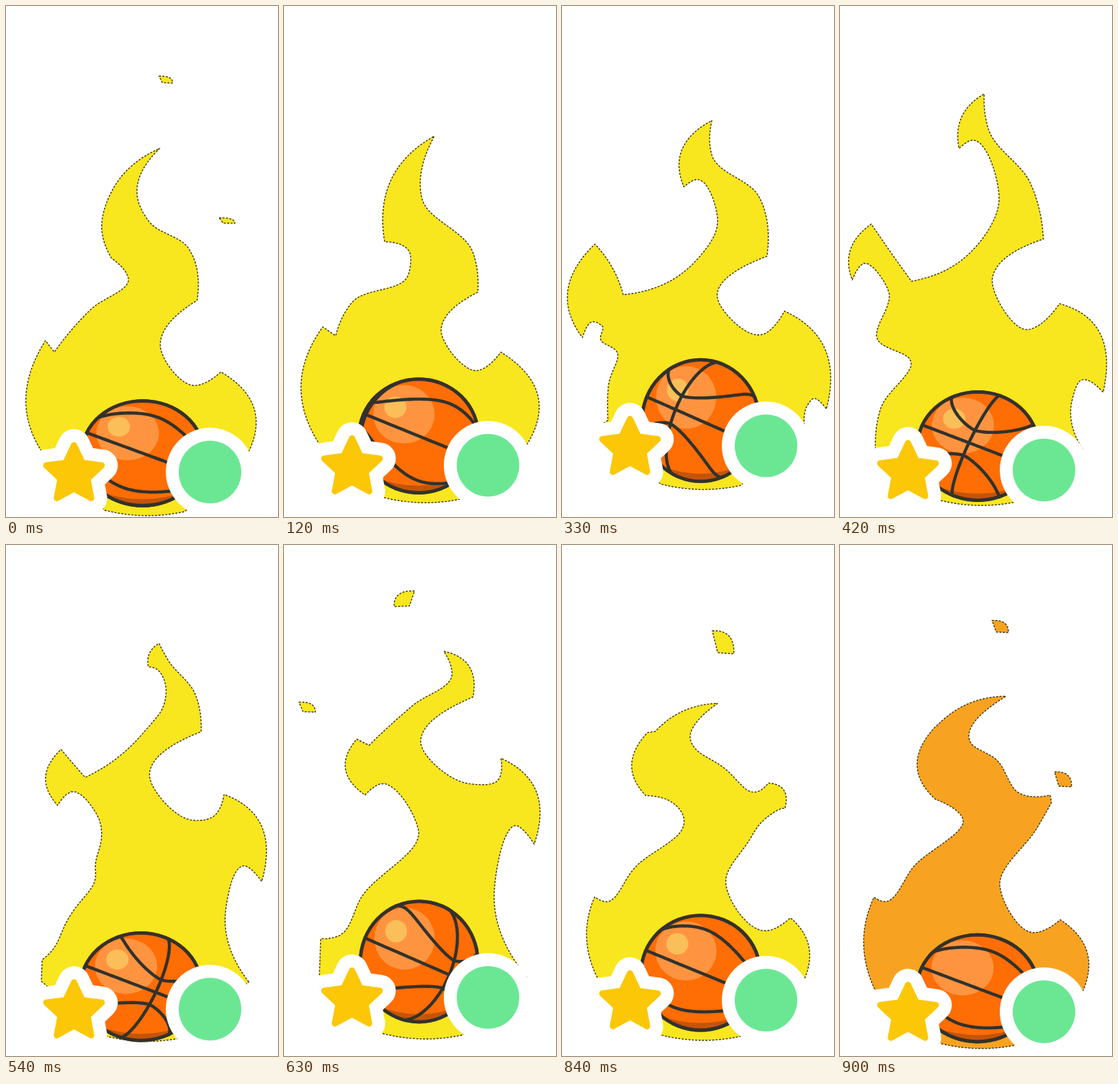
Animation of 400 by 750 pixels, one loop 930 ms. Source, as an HTML page with a canvas:

```html
<!DOCTYPE html>
<html lang="en">
<head>
<meta charset="utf-8">
<title>Flaming ball</title>
<style>
html, body { margin: 0; width: 100%; height: 100%; overflow: hidden; background: #fff; }
canvas { display: block; }
</style>
</head>
<body>
<canvas id="stage" width="400" height="750"></canvas>
<script>
const g = document.getElementById('stage').getContext('2d');
const LOOP = 930, STEP = 30, SAMPLES = 36;
const DARK = '#32322c', RAD = Math.PI / 180, TAU = 2 * Math.PI;

// Time, foot height, then the key points of the outline from right to left.
// "|" starts a section at a corner; s and m are where the edge slips behind the disc and the star.
const poses = [
  [0, 748, 's|s|s 367,600|316,537 277,557 227,500|281,432 268,355 210,316 194,285|226,209 160,264 141,330|155,370 180,400 125,445|71,508|58,491 33,610|m|m'],
  [120, 729, 's|s|s 375,582|319,508 285,535 231,475|285,420 278,362 203,283|221,191 160,250|148,346 184,360 183,394 100,435|76,484|57,471 25,560|m|m'],
  [270, 694, 's|s 372,588|390,608 388,515|330,455 308,486 231,440|303,384 297,295 222,245|226,194 171,260|182,303 200,293 227,345 185,400|80,437 73,398|50,369 5,480|38,543 57,494|78,580'],
  [420, 733, 's|s 341,580 355,549|387,567 367,460|323,437 275,475 224,400|299,342 280,260 218,180|212,129 178,165|175,209 190,198 234,285 185,368|105,404 75,362|46,320 13,368|18,402 34,378 72,420 55,490 104,520 60,590|m'],
  [630, 725, 's|s 309,515 345,413|368,439 365,350|319,313 315,345 270,350 201,290|278,223 270,175|235,156|235,156 247,190 190,235|125,294|107,285 90,325|119,367 140,351 198,420 115,515 80,574|54,578'],
  [750, 709, 's 362,575|354,543 325,562 248,485 290,418 305,383 347,377|353,400 350,340|295,323 303,355 215,322 183,292|206,248|206,248|206,248 150,266|118,297|104,288 86,328|98,360 130,352 189,408 105,472 62,524|45,516 38,560'],
  [900, 739, 's 364,600|324,550 285,569 235,500 290,415|311,378|309,367 265,365 230,315 192,290|244,222|244,222|244,222 180,237|150,258|140,267 114,330|140,373 180,400 110,470 62,523|50,517 35,575']
];

// Loose flakes: start, end, then x, y, width and height at either end.
const flakes = [
  [690, 930, [240, 201, 51, 73], [235, 108, 20, 10]],
  [900, 930, [328, 344, 25, 22], [325, 315, 23, 8]],
  [570, 690, [182, 100, -36, 34], [172, 58, -24, 12]],
  [570, 660, [36, 270, 30, 24], [33, 222, 21, 10]]
];

const stickerTimes = [0, 120, 270, 420, 480, 630, 750, 900, 930];
const stickerY = [684, 674, 629, 681, 686, 664, 637.5, 685, 684].map(y => [y]);
const stickerAt = t => cubic(stickerY, stickerTimes, t)[0];
const mix = (a, b, s) => a.map((v, i) => v + (b[i] - v) * s);

// Smooth curve through points p at knots k, evaluated at x.
function cubic(p, k, x) {
  const last = p.length - 1;
  let i = 0;
  while (i < last - 1 && x > k[i + 1]) i++;
  const h = k[i + 1] - k[i];
  if (!h) return p[i];
  const s = (x - k[i]) / h, r = 1 - s;
  return p[i].map((a, d) => {
    const slope = n => (p[n + 1][d] - p[n][d]) / (k[n + 1] - k[n]);
    const tangent = n => {
      if (last === 1) return slope(0);
      if (n === 0) return 2 * slope(0) - tangent(1);
      if (n === last) return 2 * slope(n - 1) - tangent(n - 1);
      return (slope(n - 1) * (k[n + 1] - k[n]) + slope(n) * (k[n] - k[n - 1])) / (k[n + 1] - k[n - 1]);
    };
    return a * (1 + 2 * s) * r * r + p[i + 1][d] * s * s * (3 - 2 * s)
      + h * s * r * (tangent(i) * r - tangent(i + 1) * s);
  });
}

function trace(sections) {
  return sections.flatMap((part, n) => {
    const p = [...part, sections[(n + 1) % sections.length][0]];
    const k = [0];
    for (let i = 1; i < p.length; i++) {
      k.push(k[i - 1] + Math.hypot(p[i][0] - p[i - 1][0], p[i][1] - p[i - 1][1]));
    }
    return Array.from({ length: SAMPLES }, (_, i) => cubic(p, k, k[k.length - 1] * i / SAMPLES));
  });
}

const flame = poses.map(([t, foot, text]) => {
  const y = stickerAt(t);
  const hidden = { s: [357, y - 30], m: [52, y - 31] };
  const edge = text.split('|').map(part =>
    part.split(' ').map(q => hidden[q] || q.split(',').map(Number)));
  return [t, trace([...edge, [hidden.m], [[145, foot - 8], [205, foot]], [[263, foot - 6]]])];
});
const leaf = trace([[[-.5, -.5], [.25, -.3]], [[.5, .5]], [[-.25, .45]]]);

function line(pts) {
  g.beginPath();
  for (const [x, y] of pts) g.lineTo(x, y);
}

function drawFire(pts, color) {
  line(pts);
  g.closePath();
  g.fillStyle = color;
  g.fill();
  g.strokeStyle = '#3a300c';
  g.lineWidth = 1.4;
  g.setLineDash([3, 2]);
  g.stroke();
  g.setLineDash([]);
}

function drawFlame(t, color) {
  let i = 0;
  while (i < flame.length - 2 && t >= flame[i + 1][0]) i++;
  const [t0, a] = flame[i], [t1, b] = flame[i + 1];
  drawFire(a.map((p, n) => mix(p, b[n], (t - t0) / (t1 - t0))), color);
}

function drawFlake([t0, t1, from, to], t, color) {
  if (t < t0 || t > t1) return;
  const [x, y, w, h] = mix(from, to, (t - t0) / (t1 - t0));
  drawFire(leaf.map(p => [x + p[0] * w, y + p[1] * h]), color);
}

function drawBall(t, glint) {
  const phase = t / LOOP * 2 % 1;
  const lift = 33 * (1 - Math.cos(TAU * (phase - .04)));
  const cx = 201 - 3 * Math.sin(TAU * phase), cy = 657.5 - lift;
  const rx = 92 - .07 * lift, ry = 79 + .26 * lift;
  const spin = -93 + .2 * t;

  const oval = (x, y, r, color) => {
    g.beginPath();
    g.ellipse(cx + x * rx, cy + y * ry, r * rx, r * ry, 0, 0, TAU);
    g.fillStyle = color;
    g.fill();
  };
  g.save();
  g.beginPath();
  g.ellipse(cx, cy, rx, ry, 0, 0, TAU);
  g.clip();
  oval(0, 0, 1, '#c4540a');
  oval(0, -.9, 1.75, '#ff6d05');
  oval(-.24, -.37, .5, '#ff9440');
  if (glint) oval(-.38, -.49, .18, '#fabf58');

  // Seams turn about an axis tilted in the picture plane.
  const c = Math.cos(23 * RAD), s = Math.sin(23 * RAD);
  g.strokeStyle = DARK;
  g.lineWidth = 4.6;
  g.lineJoin = 'round';
  const seam = at => {
    g.beginPath();
    let seen = false;
    for (let a = 0; a <= 360; a += 3) {
      const [lon, lat] = at(a).map(v => v * RAD);
      const u = Math.cos(lat) * Math.sin(lon), v = Math.sin(lat);
      const front = Math.cos(lat) * Math.cos(lon) > -.03;
      const x = cx + rx * (u * c + v * s), y = cy + ry * (u * s - v * c);
      if (front) seen ? g.lineTo(x, y) : g.moveTo(x, y);
      seen = front;
    }
    g.stroke();
  };
  const bend = a => 14 + 31 * Math.abs(Math.sin(a * RAD)) ** 1.5;
  seam(a => [a, 0]);
  seam(a => [spin, a]);
  seam(a => [spin + a, bend(a)]);
  seam(a => [spin + a, -bend(a)]);
  g.restore();

  g.beginPath();
  g.ellipse(cx, cy, rx - 2.5, ry - 2.5, 0, 0, TAU);
  g.strokeStyle = DARK;
  g.lineWidth = 5;
  g.stroke();
}

function drawStar(x, y) {
  line(Array.from({ length: 10 }, (_, i) => {
    const r = i % 2 ? 21 : 43, a = i * 36 * RAD;
    return [x + r * Math.sin(a), y - r * Math.cos(a)];
  }));
  g.closePath();
  g.lineJoin = 'round';
  for (const [w, color] of [[47, '#fff'], [9, '#fbc707']]) {
    g.strokeStyle = g.fillStyle = color;
    g.lineWidth = w;
    g.stroke();
    g.fill();
  }
}

function drawDisc(x, y) {
  for (const [r, color] of [[65, '#fff'], [46, '#6be794']]) {
    g.beginPath();
    g.arc(x, y, r, 0, TAU);
    g.fillStyle = color;
    g.fill();
  }
}

function draw(now) {
  const t = Math.floor(now % LOOP / STEP) * STEP;
  const hot = t >= 900;
  const color = hot ? '#f7a321' : '#f8e61e';
  g.fillStyle = '#fff';
  g.fillRect(0, 0, 400, 750);
  drawFlame(t, color);
  for (const flake of flakes) drawFlake(flake, t || LOOP, color);
  drawBall(t, !hot);
  const y = stickerAt(t);
  drawStar(100, y + 3.5);
  drawDisc(300, y);
}

const start = performance.now();
function tick() {
  draw(performance.now() - start);
  requestAnimationFrame(tick);
}
tick();
</script>
</body>
</html>
```
